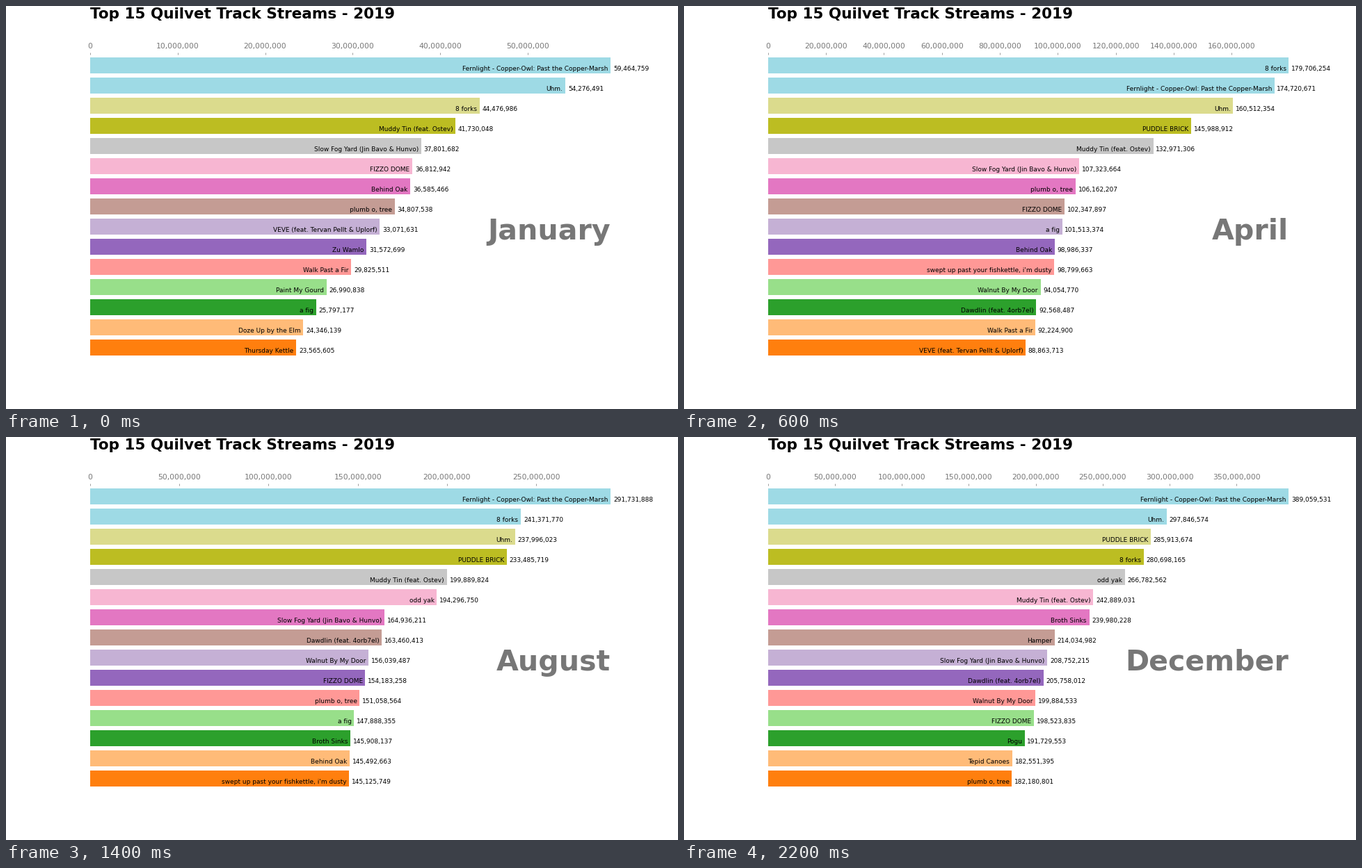
These frames come from a looping animation (966x580 px, 2400 ms). A matplotlib script:

```python
import matplotlib.pyplot as plt
import numpy as np
from matplotlib.animation import FuncAnimation
from matplotlib.ticker import StrMethodFormatter

DPI = 64.4
GRAY = "#777777"
TOP = 15
MONTHS = ("January February March April May June July August "
          "September October November December").split()

# Months with known totals; the ones between are interpolated.
KEYS = [0, 2, 4, 6, 7, 9, 11]

# title, index of first key month, totals at consecutive key months
TRACKS = [
    ("Fernlight - Copper-Owl: Past the Copper-Marsh", 0,
     [59464759, 140765381, 208675962, 266429221, 291731888, 347960214, 389059531]),
    ("Uhm.", 0,
     [54276491, 135024825, 185999884, 223642044, 237996023, 273021296, 297846574]),
    ("8 forks", 0,
     [44476986, 151349502, 198682678, 229189124, 241371770, 260784243, 280698165]),
    ("Muddy Tin (feat. Ostev)", 0,
     [41730048, 109344487, 156598126, 186904366, 199889824, 222377615, 242889031]),
    ("Slow Fog Yard (Jin Bavo & Hunvo)", 0,
     [37801682, 89528964, 125118365, 152812682, 164936211, 187515853, 208752215]),
    ("FIZZO DOME", 0,
     [36812942, 86386276, 118309519, 143018174, 154183258, 177594700, 198523835]),
    ("Behind Oak", 0,
     [36585466, 82982647, 114990028, 136475713, 145492663, 162117893]),
    ("plumb o, tree", 0,
     [34807538, 91336962, 120987453, 142151855, 151058564, 166671299, 182180801]),
    ("VEVE (feat. Tervan Pellt & Uplorf)", 0, [33071631, 76444011, 101283416]),
    ("Zu Wamlo", 0, [31572699, 71477586]),
    ("Walk Past a Fir", 0, [29825511, 76924749, 107525051]),
    ("Paint My Gourd", 0, [26990838, 66914207]),
    ("a fig", 0,
     [25797177, 84910951, 118115797, 139223264, 147888355, 163312204]),
    ("Doze Up by the Elm", 0, [24346139]),
    ("Thursday Kettle", 0, [23565605]),
    ("PUDDLE BRICK", 0,
     [20138472, 112190144, 179787680, 218497708, 233485719, 260358308, 285913674]),
    ("swept up past your fishkettle, i'm dusty", 1,
     [81527452, 116071875, 136825446, 145125749]),
    ("Walnut By My Door", 0,
     [21927350, 70773370, 117336171, 144853177, 156039487, 177869440, 199884533]),
    ("Dawdlin (feat. 4orb7el)", 1,
     [67918245, 117218729, 150437848, 163460413, 185775955, 205758012]),
    ("odd yak", 2, [105694891, 172164630, 194296750, 233202410, 266782562]),
    ("Dim Moor Path (feat. Pelly Fen Dovik) - Remix", 2, [95316027, 158508301]),
    ("Broth Sinks", 4, [145908137, 206241848, 239980228]),
    ("Hamper", 4, [133082514, 178071480, 214034982]),
    ("Pogu", 5, [158240613, 191729553]),
    ("Tepid Canoes", 5, [161093728, 182551395]),
]
# Months that leave the straight line: (track, month) -> total
BENDS = {(2, 1): 104218637, (2, 3): 179706254, (0, 8): 324513906}

SHADES = np.minimum(2 + 1.32 * np.arange(TOP), 19).astype(int)
COLORS = [plt.get_cmap("tab20")(i) for i in SHADES]


def ranking(month):
    """The leading tracks of a month as (total, title), smallest first."""
    rows = []
    for i, (title, first, totals) in enumerate(TRACKS):
        keys = KEYS[first:first + len(totals)]
        if keys[0] <= month <= keys[-1]:
            total = BENDS.get((i, month), np.interp(month, keys, totals))
            rows.append((int(total), title))
    return sorted(rows)[-TOP:]


fig = plt.figure(figsize=(966 / DPI, 580 / DPI), dpi=DPI, facecolor="white")
ax = fig.add_axes([0.125, 0.11, 0.775, 0.77])


def draw(month):
    ax.clear()
    rows = ranking(month)
    totals = [total for total, _ in rows]
    top = totals[-1]
    gap = top / 200

    ax.barh(range(len(rows)), totals, height=0.8, color=COLORS)
    for y, (total, title) in enumerate(rows):
        ax.text(total - gap, y - 0.25, title, size=10, ha="right", va="baseline")
        ax.text(total + gap, y - 0.25, f"{total:,}", size=10, ha="left", va="baseline")

    ax.text(1, 0.404, MONTHS[month], transform=ax.transAxes, color=GRAY,
            size=46, weight="bold", ha="right", va="baseline")
    ax.text(0, 1.152, "Top 15 Quilvet Track Streams - 2019", transform=ax.transAxes,
            size=24, weight="bold", ha="left", va="top")

    ax.set_xlim(0, top)
    ax.set_ylim(-0.852, 14.559)
    ax.set_yticks([])
    ax.xaxis.set_major_formatter(StrMethodFormatter("{x:,.0f}"))
    ax.xaxis.set_ticks_position("top")
    ax.tick_params(axis="x", colors=GRAY, labelsize=12)
    ax.set_frame_on(False)
    return []


anim = FuncAnimation(fig, draw, frames=len(MONTHS), init_func=lambda: draw(0),
                     interval=200, repeat=True, repeat_delay=0, blit=False)
plt.show()
```
